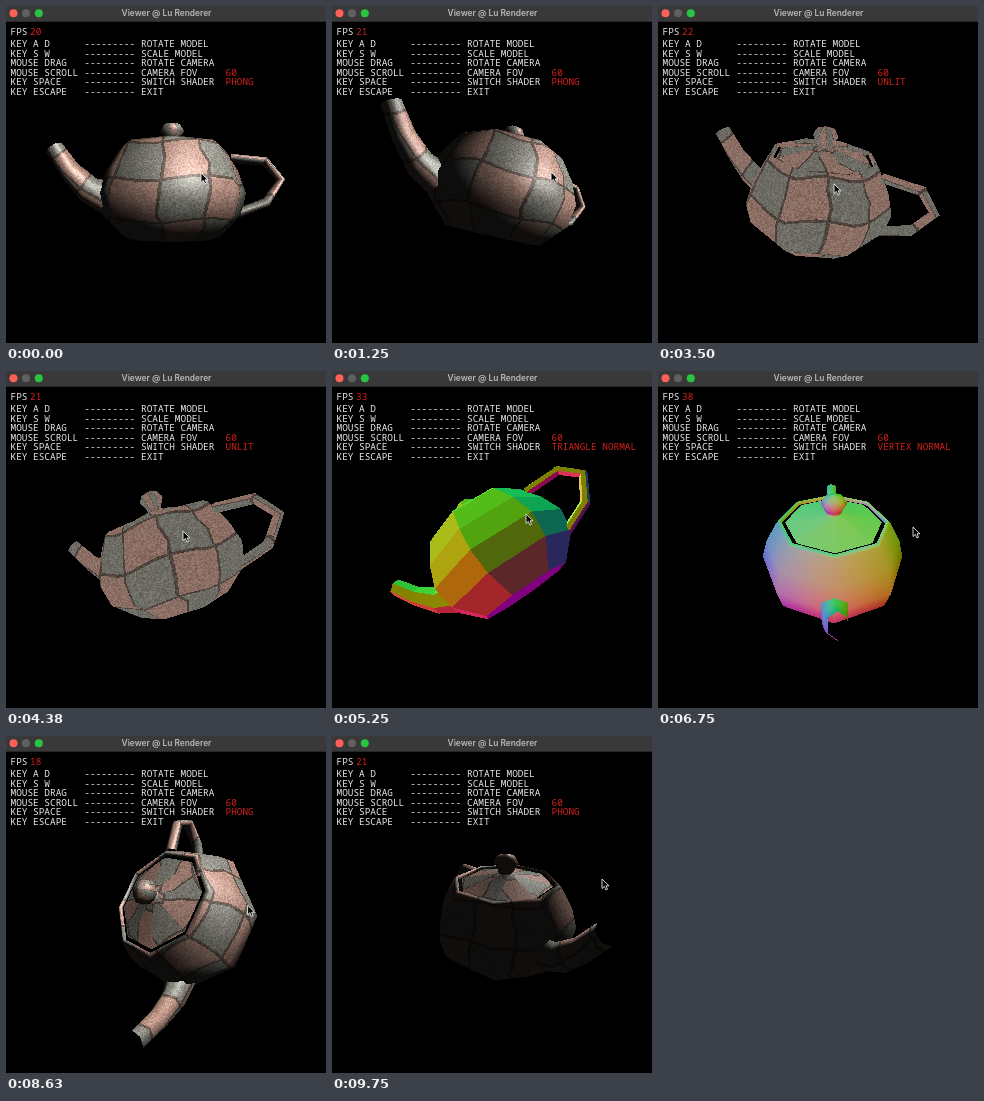
Write an HTML page with a canvas that moves like this. It is 320x337 px and loops after 9.87 s.

```html
<!DOCTYPE html>
<html lang="en">
<head>
<meta charset="utf-8">
<title>Viewer</title>
<style>
  html, body { margin: 0; width: 100%; height: 100%; overflow: hidden; background: #000; }
  canvas, svg { position: absolute; left: 0; top: 0; width: 320px; height: 337px; }
  .hud { font: 9.42px "Noto Sans Mono", "DejaVu Sans Mono", monospace; fill: #e8e8e8; }
  .hud .value { fill: #d3201c; }
  .title { font: 600 8.4px Inter, sans-serif; fill: #b9b9ba; text-anchor: middle; }
</style>
</head>
<body>
<canvas id="view" width="320" height="337"></canvas>
<svg viewBox="0 0 320 337">
  <rect width="320" height="15.7" fill="#39393a"/>
  <circle cx="7.5" cy="7.3" r="4" fill="#fe5f57"/>
  <circle cx="20" cy="7.3" r="4" fill="#606061"/>
  <circle cx="32.8" cy="7.3" r="4" fill="#29c440"/>
  <text class="title" x="160.5" y="10.3">Viewer @ Lu Renderer</text>
  <g class="hud">
    <text x="4.5" y="28.7">FPS</text>
    <text class="value" id="fps" x="24" y="28.7"></text>
    <g id="help"></g>
    <text class="value" x="219.5" y="69.5">60</text>
    <text class="value" id="shader" x="219.5" y="79"></text>
  </g>
  <path id="cursor" d="M0 0V9.5L2.3 7.4 3.9 10.9 5.5 10.2 4 6.8H7Z" fill="#000" stroke="#fff" stroke-width=".8"/>
</svg>
<script>
const W = 320, H = 337, LOOP = 9870, FOCAL = 277, DISTANCE = 7.9;
const CENTRE = [166, 178], PIVOT = [0, -1.45, .25];
const $ = id => document.getElementById(id);
const { sin, cos, floor, ceil, min, max, hypot, round, PI } = Math;

const range = (n, f) => Array.from({ length: n }, (_, i) => f(i));
const sub = (a, b) => a.map((v, i) => v - b[i]);
const dot = (a, b) => a[0] * b[0] + a[1] * b[1] + a[2] * b[2];
const cross = (a, b) => [a[1] * b[2] - a[2] * b[1], a[2] * b[0] - a[0] * b[2], a[0] * b[1] - a[1] * b[0]];
const unit = a => { const l = hypot(...a) || 1; return a.map(v => v / l); };

// Model: every part is a stack of rings joined by triangles.
const vertices = [], triangles = [];

function ring(sides, point) {
  return range(sides, j => {
    const p = point(j / sides * 2 * PI).map((v, i) => v + PIVOT[i]);
    const vertex = { p, n: [0, 0, 0] };
    vertices.push(vertex);
    return vertex;
  });
}

function face(...corners) {
  const [a, b, c] = corners.map(k => k.vertex);
  const normal = cross(sub(b.p, a.p), sub(c.p, a.p));
  if (hypot(...normal) < 1e-6) return;
  for (const vertex of [a, b, c]) vertex.n = vertex.n.map((v, i) => v + normal[i]);
  triangles.push({ corners, normal: unit(normal) });
}

function loft(rings, uStep) {
  let v = 0;
  for (let i = 0; i + 1 < rings.length; i++) {
    const next = v + hypot(...sub(rings[i + 1][0].p, rings[i][0].p));
    const sides = rings[i].length;
    for (let j = 0; j < sides; j++) {
      const corner = (r, k) => ({ vertex: rings[i + r][k % sides], u: k * uStep, v: r ? next : v });
      face(corner(0, j), corner(1, j), corner(0, j + 1));
      face(corner(0, j + 1), corner(1, j), corner(1, j + 1));
    }
    v = next;
  }
}

const lathe = profile => loft(profile.map(([r, y]) =>
  ring(8, a => [r * cos(a), y, r * sin(a)])), 1.25);

function tube(path) {
  loft(path.map(([x, y, r, depth], i) => {
    const from = path[max(0, i - 1)], to = path[min(path.length - 1, i + 1)];
    const [tx, ty] = unit([to[0] - from[0], to[1] - from[1]]);
    return ring(6, a => [x + ty * r * cos(a), y - tx * r * cos(a), depth * sin(a)]);
  }), .4);
}

const belly = range(5, i => i / 4).map(t => [1.3 + .2 * t + .65 * sin(PI * t ** .8), 2.36 * t]);
const knob = range(4, i => (i + 1) * PI / 4).map(a => [.34 * sin(a), 2.92 - .24 * cos(a)]);
const spout = range(4, i => i / 3).map(t => {
  const r = .5 - .45 * t + .2 * t * t;
  return [-1.5 - 1.8 * t ** .75, .95 + 1.5 * t ** 1.4, r, r * .85];
});
const handle = range(5, i => PI / 2 - i * PI / 4).map(a =>
  [1.6 + 1.4 * cos(a), 1.35 + .2 * cos(a) + .8 * sin(a), .13, .18]);

lathe([[0, 0], ...belly, [1.4, 2.43], [1.38, 2.32]]);
lathe([[1.28, 2.36], [.2, 2.62], ...knob]);
tube(spout);
tube(handle);
for (const vertex of vertices) vertex.n = unit(vertex.n);

// Shading, all in model space.
const LIGHT = unit([.4, .6, .8]);
const fract = x => x - floor(x);
const hash = (x, y) => fract(sin(x * 12.9898 + y * 78.233) * 43758.5453);

function stone(u, v) {
  const a = u + .08 * sin(v * 2.3) + .25;
  const b = v + .08 * sin(u * 2.7);
  const fa = fract(a), fb = fract(b);
  const seam = min(fa, 1 - fa, fb, 1 - fb) < .035;
  const red = (floor(a) + floor(b)) & 1;
  const grain = (hash(floor(u * 36), floor(v * 36)) - .5) * 34;
  const base = seam ? [78, 67, 60] : red ? [139, 110, 99] : [108, 107, 100];
  return base.map(c => c + grain);
}

const normalColour = n => [127.5 * (1 - n[0]), 127.5 * (1 + n[1]), 127.5 * (1 - n[2])];

function phong(normal, flat, u, v, eye) {
  const n = unit(normal);
  const diffuse = .12 + 1.3 * max(0, dot(n, LIGHT));
  const half = unit(LIGHT.map((l, i) => l + eye[i]));
  const gloss = 75 * max(0, dot(n, half)) ** 24;
  return stone(u, v).map(c => c * diffuse + gloss);
}

const unlit = (n, flat, u, v) => stone(u, v);
const triangleNormal = (n, flat) => normalColour(flat);
const vertexNormal = n => normalColour(unit(n)).map(c => c * .8);

const SHADERS = [
  { start: 0, name: "PHONG", fps: 19.5, shade: phong },
  { start: 12, name: "UNLIT", fps: 20, shade: unlit },
  { start: 36, name: "TRIANGLE NORMAL", fps: 35, shade: triangleNormal },
  { start: 52, name: "VERTEX NORMAL", fps: 36.5, shade: vertexNormal },
  { start: 64, name: "PHONG", fps: 19.5, shade: phong },
];

// step, yaw, pitch, roll, cursor x, cursor y
const KEYS = [
  [0, 0, -5, 0, 195, 167],
  [19, 38, -11, 20, 229, 167],
  [28, -20, 25, 6, 176, 178],
  [42, -12, -15, -35, 194, 143],
  [54, 90, 39, 0, 255, 156],
  [63, -5, 55, -80, 230, 180],
  [78, 122, 28, 0, 270, 143],
];

// Smooth curve through the keys.
function sample(step) {
  const last = KEYS.length - 1;
  let i = 0;
  while (i < last - 1 && step >= KEYS[i + 1][0]) i++;
  const a = KEYS[i], b = KEYS[i + 1], span = b[0] - a[0], s = (step - a[0]) / span;
  const slope = (k, c) => {
    const p = KEYS[max(0, k - 1)], n = KEYS[min(last, k + 1)];
    return (n[c] - p[c]) / (n[0] - p[0]) * span;
  };
  return a.map((v, c) => v + (b[c] - v) * s * s * (3 - 2 * s)
    + slope(i, c) * s * (1 - s) ** 2 - slope(i + 1, c) * s * s * (1 - s)).slice(1);
}

function rotation(...degrees) {
  const [cy, sy, cp, sp, cr, sr] = degrees.flatMap(d => [cos(d * PI / 180), sin(d * PI / 180)]);
  return ([x, y, z]) => {
    const x1 = x * cy + z * sy, z1 = z * cy - x * sy;
    const y1 = y * cp - z1 * sp;
    return [x1 * cr + y1 * sr, y1 * cr - x1 * sr, y * sp + z1 * cp];
  };
}

const context = $("view").getContext("2d");
const image = context.createImageData(W, H);
const depth = new Float32Array(W * H);

function fill({ corners, normal }, shade, eye) {
  const [a, b, c] = corners.map(k => k.vertex);
  const area = (b.x - a.x) * (c.y - a.y) - (b.y - a.y) * (c.x - a.x);
  if (area >= 0) return;
  const left = max(0, floor(min(a.x, b.x, c.x))), right = min(W - 1, ceil(max(a.x, b.x, c.x)));
  const top = max(16, floor(min(a.y, b.y, c.y))), bottom = min(H - 1, ceil(max(a.y, b.y, c.y)));
  for (let row = top; row <= bottom; row++) for (let col = left; col <= right; col++) {
    const x = col + .5, y = row + .5;
    const wa = ((b.x - x) * (c.y - y) - (b.y - y) * (c.x - x)) / area;
    const wb = ((c.x - x) * (a.y - y) - (c.y - y) * (a.x - x)) / area;
    const wc = 1 - wa - wb;
    if (wa < 0 || wb < 0 || wc < 0) continue;
    const z = wa * a.z + wb * b.z + wc * c.z, at = row * W + col;
    if (z <= depth[at]) continue;
    depth[at] = z;
    const n = a.n.map((v, i) => wa * v + wb * b.n[i] + wc * c.n[i]);
    const mix = key => wa * corners[0][key] + wb * corners[1][key] + wc * corners[2][key];
    image.data.set(shade(n, normal, mix("u"), mix("v"), eye), at * 4);
  }
}

function draw(step) {
  const [yaw, pitch, roll, mouseX, mouseY] = sample(step);
  const { name, fps, shade } = SHADERS.filter(s => s.start <= step).pop();
  const rotate = rotation(yaw, pitch, roll);
  const eye = [[1, 0, 0], [0, 1, 0], [0, 0, 1]].map(axis => rotate(axis)[2]);
  for (const vertex of vertices) {
    const [x, y, z] = rotate(vertex.p);
    vertex.z = 1 / (DISTANCE - z);
    vertex.x = CENTRE[0] + x * FOCAL * vertex.z;
    vertex.y = CENTRE[1] - y * FOCAL * vertex.z;
  }
  depth.fill(0);
  new Uint32Array(image.data.buffer).fill(0xff000000);
  for (const triangle of triangles) fill(triangle, shade, eye);
  context.putImageData(image, 0, 0);
  $("fps").textContent = round(fps + 2 * sin(step * .255));
  $("shader").textContent = name;
  $("cursor").setAttribute("transform", `translate(${mouseX} ${mouseY})`);
}

const HELP = [["KEY A D", "ROTATE MODEL"], ["KEY S W", "SCALE MODEL"], ["MOUSE DRAG", "ROTATE CAMERA"],
  ["MOUSE SCROLL", "CAMERA FOV"], ["KEY SPACE", "SWITCH SHADER"], ["KEY ESCAPE", "EXIT"]];
$("help").innerHTML = HELP.map(([key, action], i) => {
  const y = 41 + i * 9.5;
  return `<text x="4.5" y="${y}">${key}</text><text x="78.3" y="${y}">---------</text>
    <text x="135" y="${y}">${action}</text>`;
}).join("");

// The picture advances eight times a second.
let shown = -1;
function tick() {
  const step = floor(floor(performance.now() % LOOP / 10) / 12.5);
  if (step !== shown) draw(shown = step);
  requestAnimationFrame(tick);
}
tick();
</script>
</body>
</html>
```
